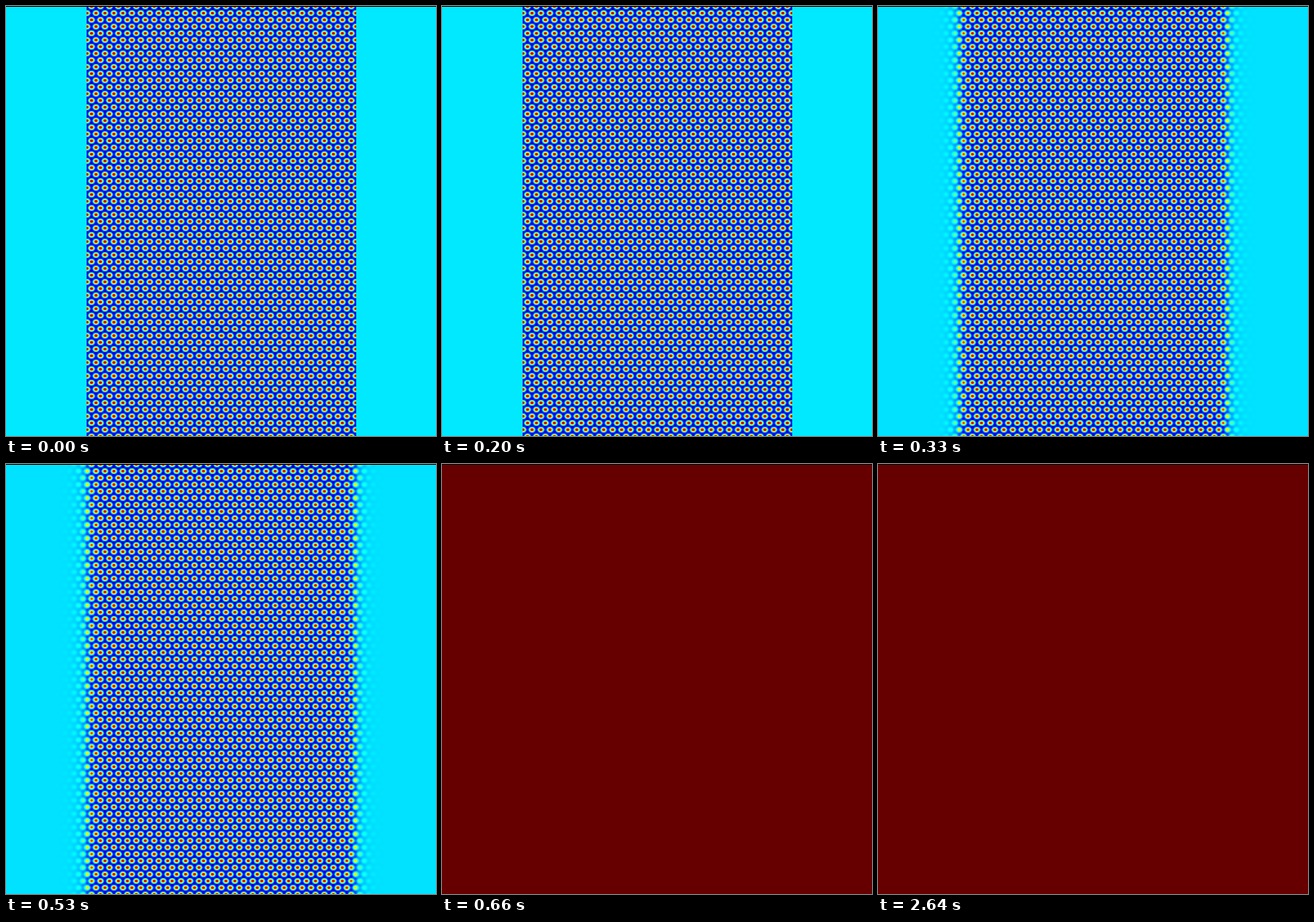
A matplotlib script that plays this animation: 512 by 512 pixels, repeating every 3.96 s.

```python
import numpy as np
import matplotlib.pyplot as plt
from matplotlib.animation import FuncAnimation

SIZE = 512
STEP = 330  # ms
STEPS = 12
LEFT, RIGHT = 96, 417  # extent of the initial crystal

y, x = np.mgrid[0:SIZE, 0:SIZE].astype(float)


def wave(pos, cycles):
    return np.cos(2 * np.pi * cycles * pos / SIZE)


def crystal(mean, gain):
    """One-mode hexagonal crystal: 48 peaks across, 64 staggered rows."""
    return mean + gain * (0.5 * wave(y, 64) - wave(x, 48) * wave(y, 32))


def seeded():
    mean = 0.354
    inside = (x >= LEFT) & (x < RIGHT)
    return np.where(inside, crystal(mean, 0.43), mean)


def relaxed():
    """The crystal edge leaks into the liquid as a decaying ripple."""
    gap = np.maximum(LEFT - x, x - RIGHT + 1)
    fade = np.exp(-np.abs(gap) / 6)
    weight = np.where(gap > 0, 0.5 * fade, 1 - 0.5 * fade)
    return crystal(0.347, 0.42 * weight)


def paint(field):
    """Blue-cyan-yellow-red ramp with dark ends; the top row stays black."""
    peaks = np.array([3, 2, 1])
    rgb = np.clip(1.5 - np.abs(4 * field[..., None] - peaks), 0, 1)
    rgb[0] = 0
    return rgb


overflow = np.full((SIZE, SIZE), 1.025)
stages = [paint(seeded()), paint(relaxed()), paint(overflow)]

fig = plt.figure(figsize=(5.12, 5.12), dpi=100, facecolor="black")
ax = fig.add_axes([0, 0, 1, 1])
ax.axis("off")
image = ax.imshow(stages[0], interpolation="nearest", aspect="auto")


def update(i):
    image.set_data(stages[min(i, 2)])
    return [image]


anim = FuncAnimation(fig, update, frames=STEPS, interval=STEP,
                     repeat=True, repeat_delay=0, blit=False)
plt.show()
```
